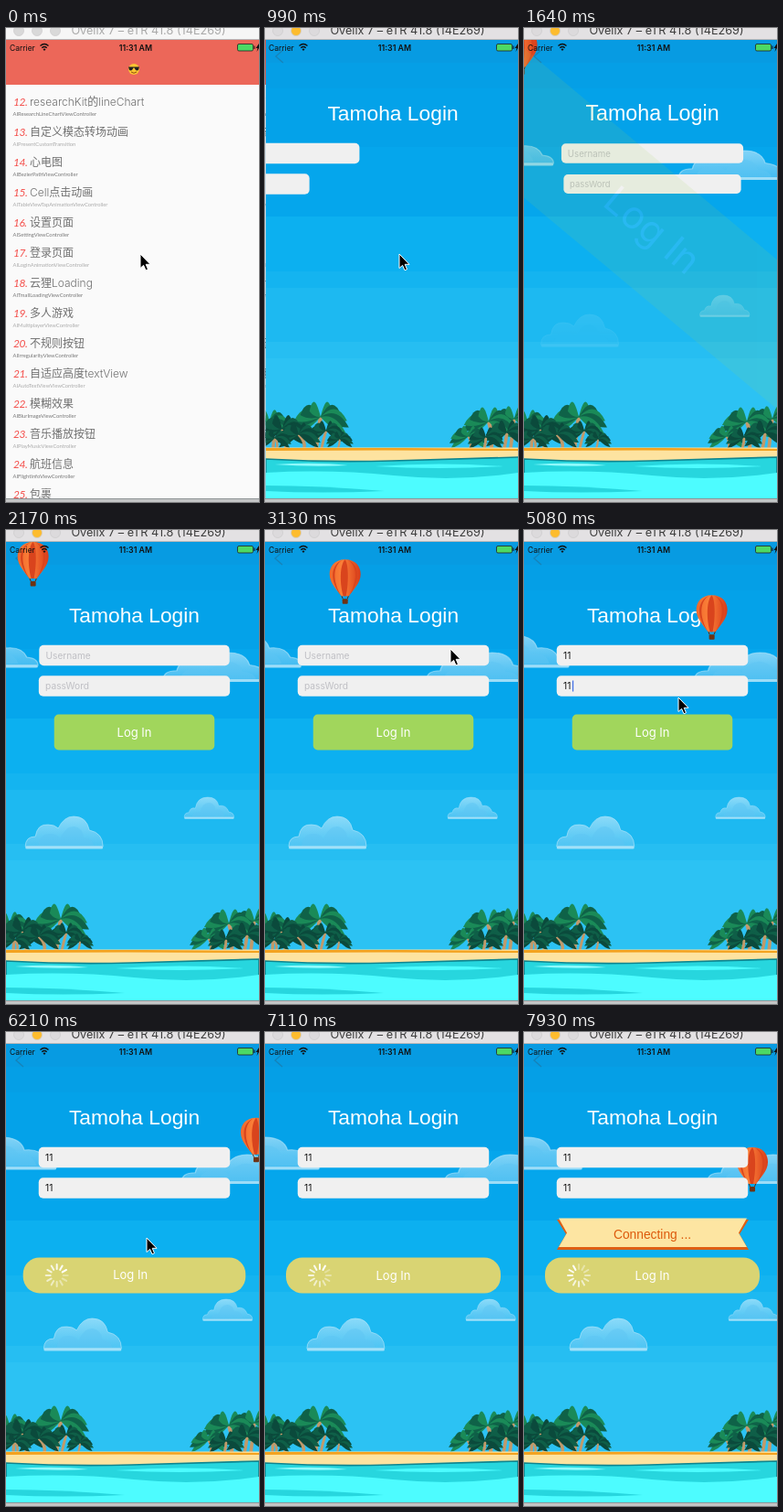
These frames come from a looping animation (277 px wide and 518 px high, 7990 ms). An HTML page:

```html
<!DOCTYPE html>
<html lang="en">
<head>
<meta charset="utf-8">
<title>Login animation</title>
<style>
  html, body { margin: 0; width: 100%; height: 100%; overflow: hidden; background: #fafafa; }
  svg { display: block; width: 277px; height: 518px; font-family: "Liberation Sans", Arial, sans-serif; }
  .ui { font-family: Inter, "Liberation Sans", sans-serif; }
  .mid { text-anchor: middle; }
  .num { font: italic 12px Lato, sans-serif; letter-spacing: -.5px; fill: #f4504c; }
  .row { font: 300 12px Inter, "Noto Sans CJK SC", "Noto Sans CJK", sans-serif; fill: #707070; }
  .sub { font: 5.8px Lato, "Open Sans", sans-serif; }
  .input { font-size: 10.2px; }
</style>
</head>
<body>
<svg viewBox="0 0 277 518">
  <defs>
    <linearGradient id="puff" x2="0" y2="1">
      <stop stop-color="#c6ecfd" stop-opacity=".65"/>
      <stop offset="1" stop-color="#6ccbf5" stop-opacity=".6"/>
    </linearGradient>
    <linearGradient id="silk">
      <stop stop-color="#f0682c"/><stop offset=".4" stop-color="#fb8038"/><stop offset="1" stop-color="#d83c1a"/>
    </linearGradient>
    <g id="peak">
      <path d="M0 33Q0 25 8 25Q10 16 19 18Q22 0 40 0Q56 0 59 14Q72 12 76 24Q85 25 85 33Z" fill="url(#puff)" stroke="#b5e6fb" stroke-opacity=".6"/>
      <path d="M13 32Q16 23 27 25Q31 8 43 9Q52 10 54 20Q66 18 69 31" fill="#5fc6f3" fill-opacity=".5"/>
      <rect y="32.5" width="85" height="3" rx="1.5" fill="#b4e6fa" fill-opacity=".85"/>
    </g>
    <g id="twin">
      <path d="M0 33Q0 22 11 22Q13 8 25 9Q32 9 36 13Q42 0 53 0Q67 0 70 15Q85 18 85 33Z" fill="url(#puff)" stroke="#b5e6fb" stroke-opacity=".6"/>
      <path d="M14 32Q16 18 28 19Q34 19 38 24Q44 10 54 11Q63 13 64 23Q74 24 75 32" fill="#5fc6f3" fill-opacity=".5"/>
      <rect y="32.5" width="85" height="3" rx="1.5" fill="#b4e6fa" fill-opacity=".85"/>
    </g>
    <clipPath id="page"><rect width="277" height="518"/></clipPath>
    <clipPath id="reveal"><rect id="curl" x="30" y="200" width="222" height="40"/></clipPath>
  </defs>

  <g id="list">
    <rect y="13" width="277" height="505" fill="#fafafa"/>
    <g id="rows"></g>
    <rect y="13" width="277" height="49" fill="#ec6759"/>
    <circle cx="140" cy="45" r="6" fill="#fcc531"/>
    <path d="M134 42.5H146L145 46Q142 47.500 140.500 43.500H139.500Q138 47.500 135 46Z" fill="#222"/>
    <path d="M137 48Q140 50.500 143 48" fill="none" stroke="#8a4b12"/>
  </g>
  <rect id="dim" y="13" width="277" height="505"/>

  <g id="login" clip-path="url(#page)">
    <g id="sky"></g>
    <g id="clouds"></g>
    <path d="M19 24L11 31L19 38" fill="none" stroke="#34566e" stroke-opacity=".35" stroke-width="1.300"/>
    <g id="trees"></g>
    <rect y="458.500" width="277" height="16" fill="#fde3a0"/>
    <path d="M0 459H150L277 460V462L130 461.500L0 462Z" fill="#f3a21f"/>
    <path d="M0 471Q70 475 138 473T277 469V514H0Z" fill="#27d6de" stroke="#0f858f" stroke-width="1.6"/>
    <g fill="#4dfcff">
      <path d="M0 486Q70 482 140 489T277 486V514H0Z"/>
      <path d="M120 479Q190 474 260 479Q190 483 120 479Z"/>
      <path d="M10 477Q55 474 90 478Q50 480 10 477Z" fill="#8ffdff"/>
      <path d="M0 500Q60 500 130 506Q60 509 0 506Z" fill="#27d6de"/>
    </g>
    <g id="heading"><text class="mid" y="7.5" font-size="22.8" fill="#fff">Tamoha Login</text></g>
    <g id="balloon">
      <path d="M-4 15L-2.500 19M4 15L2.500 19" stroke="#5d2a12"/>
      <path d="M0-24C12-24 17-16 17-8C17 2 8 10 4 16H-4C-8 10-17 2-17-8C-17-16-12-24 0-24Z" fill="url(#silk)"/>
      <path d="M0-24C-6-18-6 2-2 16H1C4 2 4-18 0-24ZM-2-24C-14-18-14 0-4 16C-17 0-17-18-2-24ZM2-24C14-18 14 0 4 16C17 0 17-18 2-24Z" fill="#d9441d"/>
      <rect x="-3" y="19" width="6" height="5.500" rx="1" fill="#6e3213"/>
    </g>
    <g id="fields" class="ui"></g>
    <g clip-path="url(#reveal)">
      <path d="M36 205H246L236 221L246 238H36L46 221Z" fill="#de5f14"/>
      <path d="M38 203.500H244L235 219.500L244 235H38L47 219.500Z" fill="#fde5a2"/>
      <text class="mid" x="140.500" y="226" font-size="13.8" fill="#dd5a0c">Connecting ...</text>
    </g>
    <g id="button">
      <rect id="pill" y="-19.500" height="39"/>
      <text id="caption" class="ui mid" y="4.500" font-size="13" fill="#fff">Log In</text>
      <g id="spinner"></g>
    </g>
  </g>

  <g class="ui" fill="#111">
    <text x="4" y="24.500" font-size="8.500">Carrier</text>
    <text class="mid" x="142" y="24.500" font-size="8.800" font-weight="600">11:31 AM</text>
    <path d="M37.500 19.500Q42 15.500 46.500 19.500M39.300 21.700Q42 19.200 44.700 21.700" fill="none" stroke="#111" stroke-width="1.400"/>
    <path d="M40.500 23.200Q42 21.800 43.500 23.200L42 25Z"/>
    <rect x="253.500" y="17.500" width="17" height="7.500" rx="1.500" fill="#4cd964" stroke="#222" stroke-width=".8"/>
    <path d="M271.500 19.500h1v3.500h-1ZM277 17L273.500 22H275.500L274.500 26L277 22Z"/>
  </g>
  <rect id="bar" width="277" height="13"/>
  <path d="M0 12.500H277" stroke="#b9b7b9"/>
  <g id="lights"></g>
  <text id="device" class="ui mid" x="156" y="7" font-size="12.700">Ovelix 7 – eTR 41.8 (14E269)</text>
  <rect y="514" width="277" height="4" fill="#c3c5c6"/>
  <path d="M0 514.500H277" stroke="#8f9496"/>
  <path id="cursor" d="M0 0V15.500L3.600 12.300L6 17.800L8.500 16.700L6.200 11.300H11Z" fill="#000" stroke="#fff"/>
</svg>
<script>
const LOOP = 7990, W = 277, MID = 140.5;
const CLICK = 320, PUSH = 530, TAP = 5790, MESSAGE = 7290;
const $ = id => document.getElementById(id);

function add(parent, name, attrs, text) {
  const node = document.createElementNS("http://www.w3.org/2000/svg", name);
  set(node, attrs);
  if (text) node.textContent = text;
  return parent.appendChild(node);
}
function set(node, attrs) {
  for (const key in attrs) node.setAttribute(key, attrs[key]);
}
const move = (node, x, y, extra = "") => set(node, { transform: `translate(${x} ${y}) ${extra}` });
const part = (t, start, length) => Math.min(1, Math.max(0, (t - start) / length));
const mix = (a, b, p) => a + (b - a) * p;
const easeInOut = p => p * p * (3 - 2 * p);
const easeIn = p => p ** 1.7;

// List page
[
  ["researchKit的lineChart", "AIResearchLineChartViewController"],
  ["自定义模态转场动画", "AIPresentCustomTransition"],
  ["心电图", "AIBezierPathViewController"],
  ["Cell点击动画", "AITableViewTapAnimationViewController"],
  ["设置页面", "AISettingViewController"],
  ["登录页面", "AILoginAnimationViewController"],
  ["云狸Loading", "AITmallLoadingViewController"],
  ["多人游戏", "AIMultiplayerViewController"],
  ["不规则按钮", "AIIrregularityViewController"],
  ["自适应高度textView", "AIAutoTextViewViewController"],
  ["模糊效果", "AIBlurImageViewController"],
  ["音乐播放按钮", "AIPlayMusicViewController"],
  ["航班信息", "AIFlightInfoViewController"],
  ["包裹", ""]
].forEach(([title, sub], i) => {
  const y = 84.5 + 33 * i;
  add($("rows"), "text", { class: "num", x: 8, y }, `${12 + i}.`);
  add($("rows"), "text", { class: "row", x: 26, y }, title);
  add($("rows"), "text", { class: "sub", x: 7.5, y: y + 11.5, fill: i % 2 ? "#aaa" : "#777" }, sub);
});

// Login page scenery
[[13, "#079be2"], [38, "#059fe6"], [66, "#04a2e9"], [130, "#05a6ec"], [206, "#0cb0f0"],
 [266, "#14b4f0"], [284, "#1db9f1"], [343, "#26bef2"], [361, "#2cc2f3"]]
  .forEach(([y, fill]) => add($("sky"), "rect", { y, width: W, height: 518 - y, fill }));

function palm(x, y, r, foot, colors) {
  add($("trees"), "path", {
    d: `M${x} ${y}Q${foot + 2} ${(y + 460) / 2} ${foot} 460`,
    fill: "none", stroke: "#c09a6b", "stroke-width": r / 7
  });
  const crown = add($("trees"), "g", {});
  move(crown, x, y);
  for (let i = 0; i < 11; i++) {
    const angle = (i * 23 - 205) * Math.PI / 180;
    const c = Math.cos(angle) * r, s = Math.sin(angle) * r;
    add(crown, "path", {
      d: `M0 0Q${c * .6} ${s * .6 - r * .4} ${c} ${s * .6 + r * .35}Q${c * .55} ${s * .4 + r * .4} 0 0`,
      fill: colors[i % 2]
    });
  }
}
const dark = ["#0b4a3c", "#0f5f48"], green = ["#1a8a58", "#0f6248"];
palm(4, 430, 24, 8, green);
palm(60, 425, 31, 55, green);
palm(66, 440, 20, 61, dark);
palm(81, 449, 15, 79, dark);
palm(18, 438, 28, 22, dark);
palm(36, 444, 24, 42, dark);
palm(10, 448, 18, 12, dark);
palm(272, 427, 26, 268, green);
palm(244, 430, 29, 247, green);
palm(264, 442, 25, 261, dark);
palm(222, 446, 21, 224, green);
palm(241, 447, 20, 239, dark);

// shape, x at 3130 ms, y, horizontal and vertical scale
const clouds = [
  ["twin", 177, 134, 1.35, .9],
  ["peak", -75, 115, 1.35, 1],
  ["peak", 200, 292, .64, .67],
  ["twin", 26, 313, 1, 1]
].map(([shape, ...place]) => ({ place, node: add($("clouds"), "use", { href: "#" + shape }) }));

const fields = [
  { y: 137, hint: "Username", start: 745, typed: [3600, 3800], focus: [3300, 4350] },
  { y: 170.5, hint: "passWord", start: 813, typed: [4700, 4850], focus: [4350, TAP] }
].map(field => {
  const group = add($("fields"), "g", {});
  add(group, "rect", { x: -104.75, y: -11.25, width: 209.5, height: 22.5, rx: 5, fill: "#f0f0f0" });
  const label = add(group, "text", { class: "input", x: -97.5, y: 3.8 });
  const caret = add(group, "rect", { y: -6, width: 1.2, height: 12, fill: "#3f6ee8" });
  return { ...field, group, label, caret };
});

const spokes = Array.from({ length: 12 }, (_, i) => add($("spinner"), "path", {
  d: "M0-7V-12", stroke: "#fff", "stroke-width": 2, "stroke-linecap": "round", transform: `rotate(${i * 30})`
}));
const lights = [14, 34, 54].map(cx => add($("lights"), "circle", { cx, cy: 3, r: 5.5, stroke: "#cfcdcf", "stroke-width": .8 }));

// Fly in from the left, then a springy pulse
function flyIn(node, y, start, t) {
  const x = MID - W * (1 - easeInOut(part(t, start, 500)));
  const s = (t - start - 500) / 1000;
  const scale = s < 0 ? 1 : 1 + .25 * Math.exp(-3.75 * s) * Math.cos(9.27 * s);
  move(node, x, y, `scale(${scale})`);
}

function drawChrome(t) {
  const active = t >= CLICK;
  set($("bar"), { fill: active ? "#e3e1e3" : "#f6f6f6" });
  set($("device"), { fill: active ? "#3c3c3c" : "#a9a9a9" });
  lights.forEach((light, i) => set(light, { fill: !active ? "#d9d9d9" : i == 1 ? "#fdbc2d" : "#dcdadc" }));
}

function drawPush(t) {
  const k = Math.max(0, t - PUSH) * .0174;
  const left = (1 + k) * Math.exp(-k);
  move($("login"), W * left, 0);
  move($("list"), -.3 * W * (1 - left), 0);
  set($("dim"), { opacity: .1 * (1 - left) });
}

function drawSky(t) {
  clouds.forEach(({ place: [x, y, sx, sy], node }, i) => {
    move(node, x + .005 * (t - 3130), y, `scale(${sx} ${sy})`);
    set(node, { opacity: part(t, 1010 + 180 * i, 500) });
  });
  const out = part(t, 1068, 5804), back = part(t, 6872, 5804);
  move($("balloon"), mix(mix(-37, 314, out), -37, back), mix(15, 131, out) + 104 * back);
}

function drawFields(t) {
  for (const f of fields) {
    flyIn(f.group, f.y, f.start, t);
    const count = f.typed.filter(time => t >= time).length;
    f.label.textContent = count ? "1".repeat(count) : f.hint;
    set(f.label, { fill: count ? "#111" : "#bfbfc4" });
    set(f.caret, { x: -97.5 + 5 * count, opacity: t >= f.focus[0] && t < f.focus[1] ? 1 : 0 });
  }
}

function drawButton(t) {
  const p = easeIn(part(t, 1500, 500));
  const s = Math.max(0, t - TAP) / 1000;
  const grow = 1 - Math.exp(-4.6 * s) * Math.cos(22.5 * s);
  const drop = 1 - Math.exp(-21 * s) * (1 + 21 * s);
  const width = 175.5 + 59.5 * grow, tint = part(t, TAP, 330);
  const fill = `rgb(${mix(161, 217, tint)},${mix(214, 212, tint)},${mix(92, 115, tint)})`;
  move($("button"), MID, 221 + 45 * drop, `rotate(${45 * (1 - p)}) scale(${mix(3.5, 1, p)})`);
  set($("button"), { opacity: p });
  set($("pill"), { x: -width / 2, width, rx: mix(5, 18, tint), fill });
  set($("caption"), { x: 29.75 * Math.min(0, 1 - grow) });
  move($("spinner"), -width / 2 + 37, 0);
  set($("spinner"), { opacity: tint });
  const head = Math.floor(t / 83);
  spokes.forEach((spoke, i) => set(spoke, { opacity: 1 - .75 * ((head - i + 1200) % 12) / 12 }));
}

const route = [[2400, 147, 247], [2900, 203, 130], [4000, 203, 130], [4400, 173, 169],
  [4950, 173, 169], [5080, 169, 183], [5500, 154, 225], [6240, 154, 225], [6330, 152, 476]];
function drawCursor(t) {
  let i = route.findIndex(stop => stop[0] > t);
  if (i < 0) i = route.length - 1;
  const b = route[i], a = route[Math.max(0, i - 1)];
  const p = a === b ? 0 : easeInOut(part(t, a[0], b[0] - a[0]));
  const shown = t < 1310 || t >= 2400 && t < 6350;
  move($("cursor"), mix(a[1], b[1], p), mix(a[2], b[2], p));
  set($("cursor"), { opacity: shown ? 1 : 0 });
}

function draw(now) {
  const t = now % LOOP;
  drawChrome(t);
  drawPush(t);
  drawSky(t);
  flyIn($("heading"), 93, 510, t);
  drawFields(t);
  drawButton(t);
  set($("curl"), { height: 40 * easeInOut(part(t, MESSAGE, 330)) });
  drawCursor(t);
}

let begin;
function tick(now) {
  begin ??= now;
  draw(now - begin);
  requestAnimationFrame(tick);
}
draw(0);
requestAnimationFrame(tick);
</script>
</body>
</html>
```
